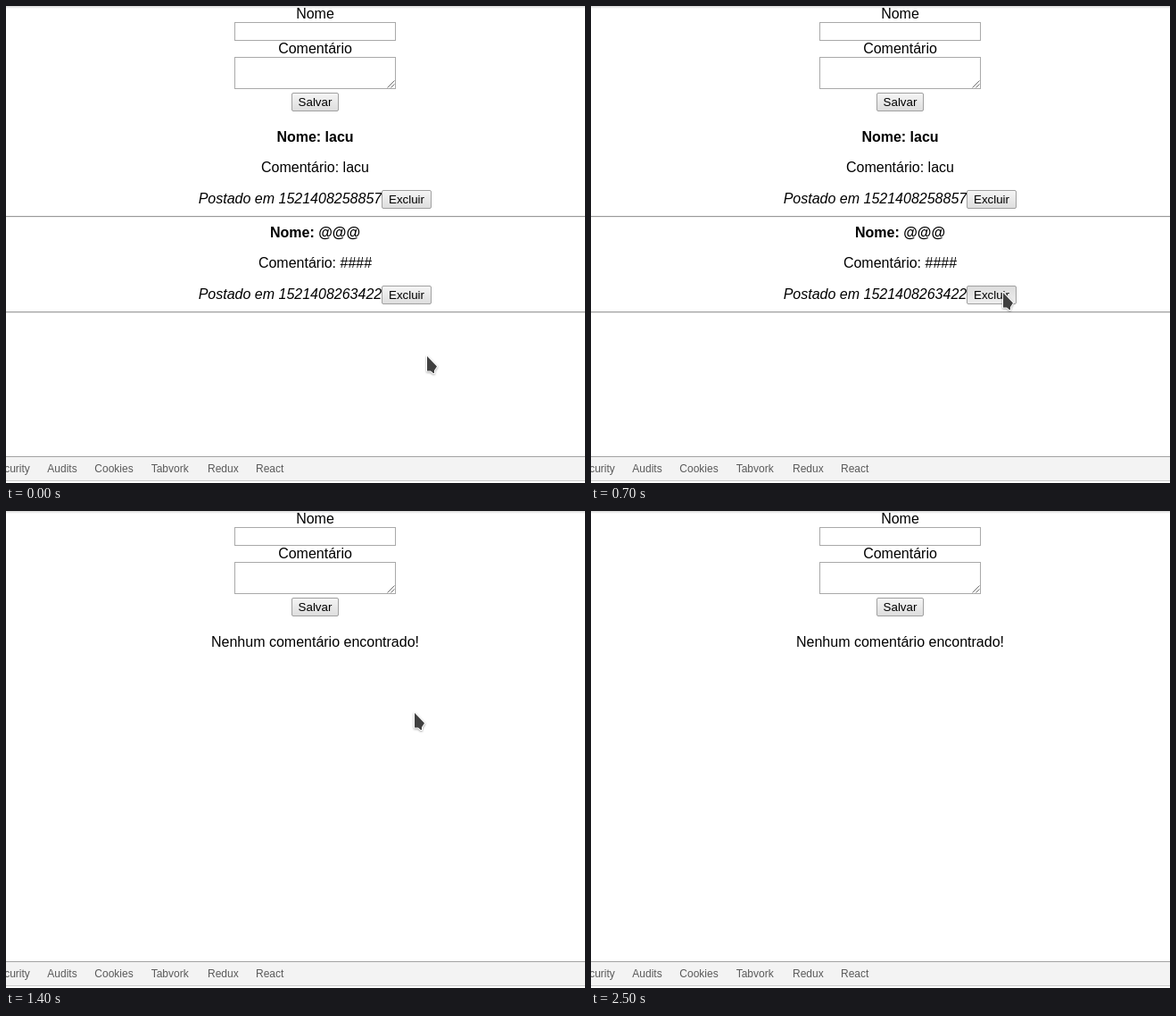
These frames come from a looping animation (649 px wide and 534 px high, 2.6 s). An HTML page:

```html
<!DOCTYPE html>
<html lang="pt">
<head>
<meta charset="utf-8">
<style>
  html, body { margin: 0; width: 100%; height: 100%; overflow: hidden; background: #fff; }
  svg { display: block; font: 16px "Liberation Sans", Arial, sans-serif; }
  .b { font-weight: bold; }
  .i { font-style: italic; }
  .mid { text-anchor: middle; }
  .field { fill: #fff; stroke: #a9a9a9; }
  .btn rect { fill: url(#up); stroke: #a0a0a0; }
  .btn text { font-size: 13.333px; }
  .btn.hover rect { stroke: #707070; }
  .btn.down rect { fill: url(#down); stroke: #a0a0a0; }
  .tabs { font-size: 12px; fill: #5a5a5a; }
  #cursor { filter: drop-shadow(0 1px 1px rgba(0, 0, 0, .35)); }
  #cursor path { fill: #404040; stroke: #fff; stroke-width: 2; stroke-linejoin: round; paint-order: stroke; }
</style>
</head>
<body>
<svg width="649" height="534" viewBox="0 0 649 534">
  <defs>
    <linearGradient id="up" x2="0" y2="1"><stop stop-color="#f5f5f5"/><stop offset="1" stop-color="#dddddd"/></linearGradient>
    <linearGradient id="down" x2="0" y2="1"><stop stop-color="#dcdcdc"/><stop offset="1" stop-color="#eeeeee"/></linearGradient>
    <linearGradient id="shade" x2="0" y2="1"><stop stop-color="#d8d8d8"/><stop offset="1" stop-color="#fff"/></linearGradient>
  </defs>
  <rect width="649" height="3" fill="url(#shade)"/>
  <g id="page"></g>
  <g class="tabs" id="tabs">
    <rect y="504" width="649" height="28" fill="#f3f3f3"/>
    <path d="M0 504.5H649" stroke="#a3a3a3"/>
    <path d="M0 531.5H649" stroke="#cccccc"/>
  </g>
  <g id="cursor"><path d="M0 0V16.5H4L7 19H8V16L11 11.5Z"/></g>
</svg>
<script>
const LOOP = 2600, TICK = 100, MID = 346.5;
const PRESS_B = 700, DROP_B = 800, PRESS_A = 1300, DROP_A = 1400;

// pointer waypoints: time, x, y
const PATH = [
  [0, 472, 392], [100, 482, 385], [200, 485, 372], [300, 480, 355], [400, 470, 338],
  [600, 462, 321], [800, 462, 320], [1000, 460, 264], [1100, 459, 240], [1200, 458, 228],
  [1300, 458, 226], [1500, 457, 226], [1600, 457, 226], [1700, 444, 220],
  [1800, 375, 178], [2000, 164, 27], [2100, 66, -45], [2600, 66, -45]
];

const $ = id => document.getElementById(id);

function add(parent, tag, attrs, text) {
  const el = document.createElementNS("http://www.w3.org/2000/svg", tag);
  for (const k in attrs) el.setAttribute(k, attrs[k]);
  if (text) el.textContent = text;
  return parent.appendChild(el);
}

const label = (g, y, text, cls = "") => add(g, "text", { x: MID, y, class: "mid " + cls }, text);

const box = (g, x, y, w, h, attrs) =>
  add(g, "rect", { x: x + .5, y: y + .5, width: w - 1, height: h - 1, ...attrs });

function button(parent, x, y, w, text) {
  const g = add(parent, "g", { class: "btn" });
  box(g, x, y, w, 21, { rx: 1.5 });
  add(g, "text", { x: x + w / 2, y: y + 15, class: "mid" }, text);
  return g;
}

function comment(y, name, body, stamp) {
  const g = add(page, "g", { transform: `translate(0 ${y})` });
  label(g, 15, "Nome: " + name, "b");
  label(g, 49, "Comentário: " + body);
  add(g, "text", { x: 215.7, y: 84, class: "i" }, "Postado em " + stamp);
  const btn = button(g, 421, 69, 56, "Excluir");
  add(g, "path", { d: "M0 98.5H649", stroke: "#9a9a9a" });
  add(g, "path", { d: "M0 99.5H649", stroke: "#eeeeee" });
  return { g, btn, top: y + 69 };
}

const page = $("page"), cursor = $("cursor");
label(page, 14, "Nome");
box(page, 256, 18, 181, 21, { class: "field" });
label(page, 53, "Comentário");
box(page, 256, 57, 181, 36, { class: "field" });
add(page, "path", { d: "M427.5 91.5L435.5 83.5M431.5 91.5L435.5 87.5", stroke: "#707070" });
button(page, 320, 97, 53, "Salvar");
const first = comment(137, "lacu", "lacu", "1521408258857");
const second = comment(244, "@@@", "####", "1521408263422");
const empty = label(page, 152, "Nenhum comentário encontrado!");

const TABS = [["Security", -16.5], ["Audits", 46.3], ["Cookies", 99.3], ["Tabvork", 162.7], ["Redux", 226], ["React", 280]];
for (const [text, x] of TABS) add($("tabs"), "text", { x, y: 522 }, text);

function pointAt(t) {
  const i = PATH.findIndex(p => p[0] > t);
  const [t0, x0, y0] = PATH[i - 1], [t1, x1, y1] = PATH[i];
  const k = (t - t0) / (t1 - t0);
  return [Math.round(x0 + (x1 - x0) * k), Math.round(y0 + (y1 - y0) * k)];
}

const show = (el, on) => el.setAttribute("visibility", on ? "visible" : "hidden");

function update(item, t, y, press, drop) {
  show(item.g, t < drop);
  item.btn.classList.toggle("hover", y >= item.top && y < item.top + 21);
  item.btn.classList.toggle("down", t >= press && t < drop);
}

function draw(now) {
  const t = Math.floor(now % LOOP / TICK) * TICK;
  const [x, y] = pointAt(t);
  cursor.setAttribute("transform", `translate(${x} ${y})`);
  update(first, t, y, PRESS_A, DROP_A);
  update(second, t, y, PRESS_B, DROP_B);
  show(empty, t >= DROP_A);
}

const start = performance.now();
function frame() {
  draw(performance.now() - start);
  requestAnimationFrame(frame);
}
frame();
</script>
</body>
</html>
```
